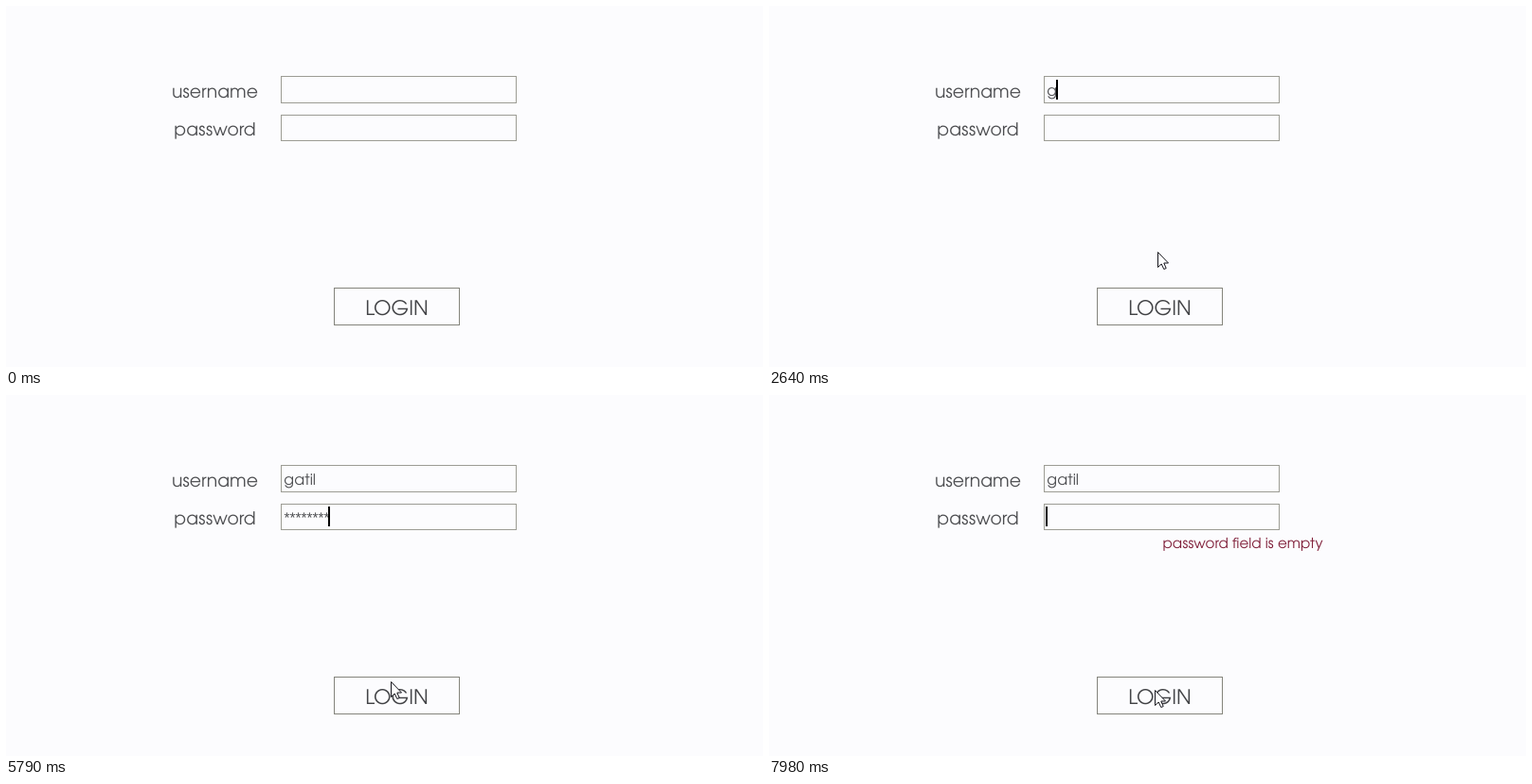
These frames come from a looping animation (799 by 382 pixels, 8 s). An HTML page:

```html
<!DOCTYPE html>
<html lang="en">
<head>
<meta charset="utf-8">
<title>Login form</title>
<style>
  html, body { margin: 0; width: 100%; height: 100%; overflow: hidden; background: #fcfcfe; }
  svg { display: block; width: 799px; height: 382px; }
  text {
    font-family: "Century Gothic", "URW Gothic", Inter, Lato, sans-serif;
    font-feature-settings: "cv11";
    text-rendering: geometricPrecision;
    fill: #4e4f52;
  }
  .label { font-size: 18.8px; text-anchor: middle; }
  .button { font-size: 21.3px; text-anchor: middle; fill: #424346; }
  .entry { font-size: 16px; }
  .stars { font: 15.42px "Liberation Sans", sans-serif; }
  .error { font-size: 15.1px; fill: #80203a; }
  .box { fill: none; stroke: #9c9c94; shape-rendering: crispEdges; }
  .box.dark { stroke: #84847c; }
  #caret { fill: #000; shape-rendering: crispEdges; }
  #pointer { fill: #fff; stroke: #14141c; }
</style>
</head>
<body>
<svg viewBox="0 0 799 382">
  <text class="label" x="220.5" y="97">username</text>
  <text class="label" x="220.5" y="137">password</text>
  <rect class="box" x="290.5" y="74.5" width="248" height="28"/>
  <rect class="box" x="290.5" y="115.5" width="248" height="27"/>
  <rect class="box dark" x="346.5" y="298.5" width="132" height="39"/>
  <text class="button" x="412.5" y="326.5">LOGIN</text>
  <text class="entry" id="user" x="293.3" y="95"></text>
  <text class="stars" id="pass" x="293.5" y="135"></text>
  <text class="error" id="error" x="415.5" y="162"></text>
  <rect id="caret" width="2" height="21"/>
  <path id="pointer" d="M.5 .5V16.5L4.2 13L6.8 18.5L9.2 17.5L6.8 12H11.5Z"/>
</svg>
<script>
const LOOP = 8000, BLINK = 470;
const focusName = 840, focusPass = 3220, submit = 6000, resubmit = 7300;

const nameTyping = { text: "gatil", start: 2640, gap: 116 };
const passTyping = { text: "*".repeat(8), start: 3560, gap: 182 };

// pointer stops: time, x, y
const stops = [
  [30, 478, 378], [820, 342, 86], [1180, 433, 271], [1350, 428, 306],
  [1630, 410, 260], [5360, 410, 260], [5790, 406, 303], [submit, 407, 312]
];

const [user, pass, error, caret, pointer] =
  ["user", "pass", "error", "caret", "pointer"].map(id => document.getElementById(id));

const clamp = (v, min, max) => Math.min(max, Math.max(min, v));
const show = (node, on) => { node.style.visibility = on ? "visible" : "hidden"; };

function typedCount({ text, start, gap }, t) {
  return clamp(Math.floor((t - start) / gap) + 1, 0, text.length);
}

function lastKey(typing, t) {
  const n = typedCount(typing, t);
  return n ? typing.start + (n - 1) * typing.gap : 0;
}

function pointerAt(t) {
  const next = stops.findIndex(stop => stop[0] > t);
  if (next < 1) return stops.at(next).slice(1);
  const [t0, ...from] = stops[next - 1], [t1, ...to] = stops[next];
  const k = (t - t0) / (t1 - t0);
  const ease = k * k * (3 - 2 * k);
  return from.map((v, i) => Math.round(v + (to[i] - v) * ease));
}

function drawCaret(t) {
  const inPass = t >= focusPass;
  const field = inPass ? pass : user;
  const width = field.textContent ? field.getComputedTextLength() : 0;
  const active = Math.max(inPass ? focusPass : focusName, lastKey(nameTyping, t), lastKey(passTyping, t));
  const lit = t >= submit || Math.floor((t - active) / BLINK) % 2 === 0;
  caret.setAttribute("x", 292 + Math.round(width));
  caret.setAttribute("y", inPass ? 118 : 78);
  show(caret, t >= focusName && lit);
}

function draw(t) {
  const stars = t < submit ? typedCount(passTyping, t) : 0;
  user.textContent = nameTyping.text.slice(0, typedCount(nameTyping, t));
  pass.textContent = passTyping.text.slice(0, stars);
  error.textContent = t < resubmit ? "incorrect credentials" : "password field is empty";
  error.style.letterSpacing = t < resubmit ? ".2px" : "0";
  show(error, t >= submit);
  drawCaret(t);
  pointer.setAttribute("transform", `translate(${pointerAt(t)})`);
  show(pointer, t >= stops[0][0]);
}

const start = performance.now();
function tick() {
  draw((performance.now() - start) % LOOP);
  requestAnimationFrame(tick);
}
tick();
</script>
</body>
</html>
```
